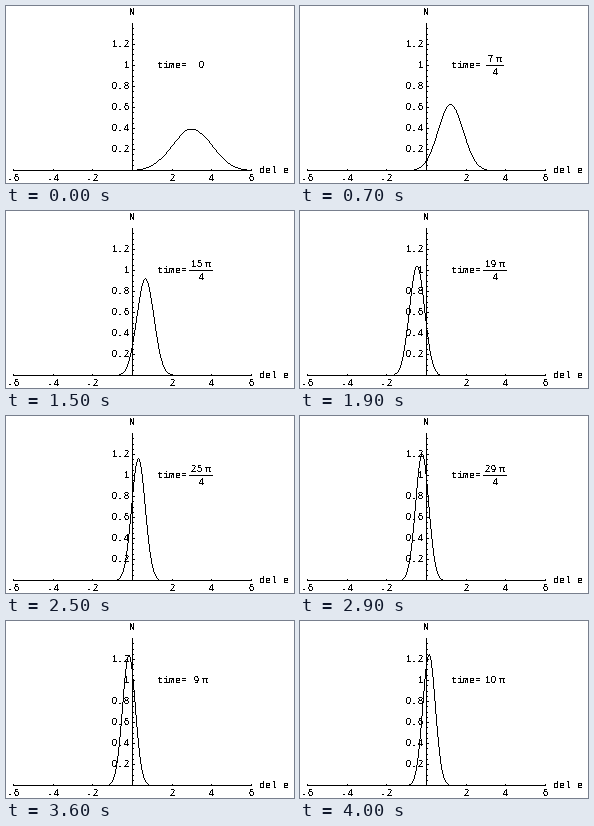
Write a matplotlib script that moves like this. It is 288x177 px and loops after 4100 ms.

```python
import numpy as np
import matplotlib.pyplot as plt
from matplotlib.animation import FuncAnimation

W, H = 288, 177
FRAMES, INTERVAL = 41, 100
X0, Y0 = 126, 164          # pixel column and row of the axes
X_UNIT, Y_UNIT = 19.83, 105
CHAR = 6                   # character advance in pixels
PI_WIDTH, PI_GAP = 7, 3
VALUE_X, TEXT_Y = 195, 62

plt.rcParams.update({
    "text.antialiased": False,
    "text.hinting": "native",
    "text.hinting_factor": 1,
    "path.simplify": False,
})

fig = plt.figure(figsize=(W / 72, H / 72), dpi=72, facecolor="white")
ax = fig.add_axes([0, 0, 1, 1])
ax.set_xlim(0, W)
ax.set_ylim(H, 0)
ax.axis("off")


def write(x, baseline, text):
    """Set text on a fixed grid, with small undotted digits."""
    glyphs = []
    for i, char in enumerate(text):
        digit = char.isdigit()
        glyphs.append(ax.text(
            x + CHAR * i + digit, baseline, char, color="black",
            family="Liberation Sans" if digit else "Liberation Mono",
            size=9 if digit else 10, ha="left", va="baseline"))
    return glyphs


def stroke(xs, ys):
    """Hard-edged line, a hair under one pixel so it never spills over."""
    line, = ax.plot(xs, ys, color="black", lw=0.9, antialiased=False,
                    snap=False, solid_capstyle="butt")
    return line


def column(x):
    return int(X0 + 0.5 + X_UNIT * x)


def row(y):
    return int(Y0 + 0.5 - Y_UNIT * y)


def draw_axes():
    stroke([column(-6), column(6) + 1], [Y0 + 0.5] * 2)
    stroke([X0 + 0.5] * 2, [row(1.4), Y0 + 1])
    for i in range(-6, 7, 2):
        x = column(i)
        if i:
            stroke([x + 0.5] * 2, [Y0 - 1, Y0])
            text = str(i)
            write(x - CHAR * len(text) // 2, 175, text)
    for i in range(1, 28):
        major = i % 4 == 0
        y = row(i / 20)
        stroke([X0 + 1, X0 + (3 if major else 2)], [y + 0.5] * 2)
        if major:
            text = f"{i / 20:g}"
            write(123 - CHAR * len(text), y + 3, text)
    write(X0 - 3, 9, "N")
    write(253, 167, "del e")
    write(151, TEXT_Y, "time=")


def pixel_dashes(xs, ys):
    """Trace a path as unit dashes, one per step along its longer axis."""
    steps = np.maximum(np.abs(np.diff(xs)), np.abs(np.diff(ys)))
    length = np.concatenate([[0], np.cumsum(steps)])
    at = np.arange(0, length[-1])
    left = np.floor(np.interp(at, length, xs))
    mid = np.floor(np.interp(at, length, ys)) + 0.5
    gap = np.full_like(at, np.nan)
    dash_x = np.column_stack([left + 0.05, left + 0.95, gap])
    dash_y = np.column_stack([mid, mid, gap])
    return dash_x.ravel(), dash_y.ravel()


draw_axes()
x = np.linspace(-6, 6, 1201)
curve = stroke([], [])
bar = stroke([], [])
value = []


def show_time(n):
    """Write n * pi / 4 as a reduced fraction."""
    while value:
        value.pop().remove()
    bar.set_data([], [])
    if n == 0:
        value.extend(write(VALUE_X - 3, TEXT_Y, "0"))
        return
    divisor = int(np.gcd(n, 4))
    top, bottom = n // divisor, 4 // divisor
    number = "" if top == 1 else str(top)
    width = CHAR * len(number) + PI_WIDTH + (PI_GAP if number else 0)
    left = VALUE_X - width // 2
    baseline = TEXT_Y
    if bottom > 1:
        baseline = 56
        bar.set_data([left - 1, left + width + 1], [59.5, 59.5])
        value.extend(write(VALUE_X - 3, 69, str(bottom)))
    value.extend(write(left, baseline, number))
    value.extend(write(left + width - PI_WIDTH, baseline, "π"))


def update(n):
    t = n * np.pi / 4
    # Damped oscillation of the mean, relaxing variance
    mean = 3 * np.exp(-0.1 * t) * np.cos(t)
    var = 0.1 + 0.9 * np.exp(-0.2 * t)
    density = np.exp(-(x - mean) ** 2 / (2 * var)) / np.sqrt(2 * np.pi * var)
    curve.set_data(*pixel_dashes(X0 + 0.5 + X_UNIT * x,
                                 Y0 + 0.9 - Y_UNIT * density))
    show_time(n)
    return curve, bar, *value


anim = FuncAnimation(fig, update, frames=FRAMES, interval=INTERVAL,
                     repeat=True, repeat_delay=0, blit=False)
plt.show()
```
